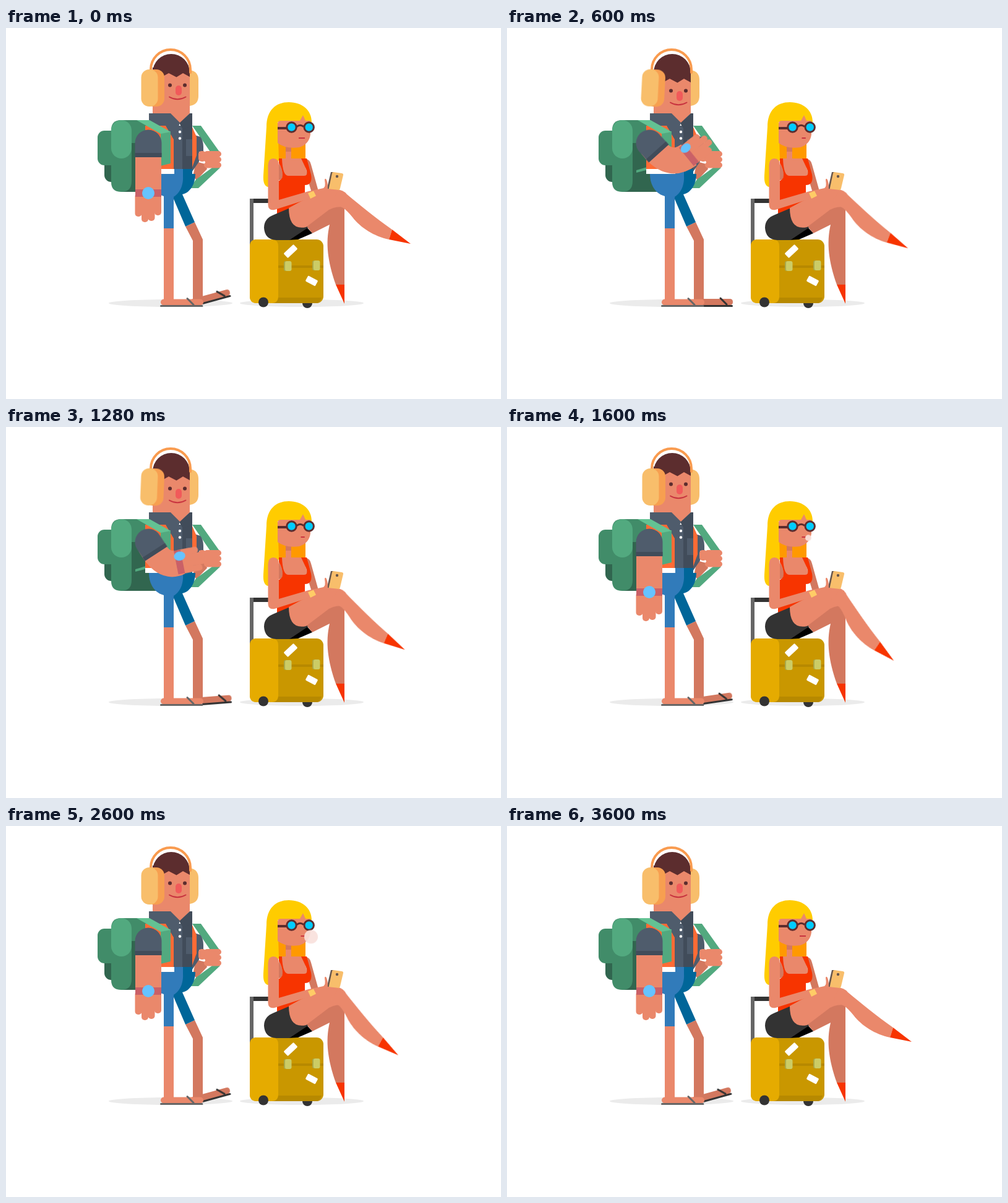
An HTML page without scripts for the animation above (3640 ms loop, 800 by 600 pixels).

```html
<!DOCTYPE html>
<html lang="en">
<head>
<meta charset="utf-8">
<title>Waiting travellers</title>
<style>
  html, body { margin: 0; width: 100%; height: 100%; overflow: hidden; background: #fff; }
  svg { display: block; width: 800px; height: 600px; }

  .skin { fill: #ea886b; }
  .skin-dark { fill: #d3785f; }
  .shirt { fill: #4f5c6c; }
  .shirt-dark { fill: #414c5a; }
  .green { fill: #418c69; }
  .green-light { fill: #52a97f; }
  .green-dark { fill: #31664f; }
  .brown { fill: #5c2d2e; }
  .sand { fill: #f8be6b; }
  .vest { fill: #ff6b35; }
  .red { fill: #f73400; }
  .coal { fill: #333; }
  .line { fill: none; stroke-linecap: round; }

  /* one look at the watch per loop */
  .look { animation: 3640ms infinite ease-in-out; }
  .nod { animation-name: nod; }
  .pad { animation-name: pad; transform-origin: 237px 97px; }
  .sleeve { animation-name: sleeve; transform-origin: 230px 186px; }
  .forearm { animation-name: forearm; fill: none; stroke: #ea886b; stroke-width: 42; }
  .hand { animation-name: hand; }
  .watch { animation-name: watch; }
  @keyframes nod {
    0%, 2.7%, 43.4%, 100% { transform: none; }
    14.8%, 31.3% { transform: translateY(9px); }
  }
  @keyframes pad {
    0%, 2.7%, 43.4%, 100% { transform: none; }
    14.8%, 31.3% { transform: translateX(-1px) rotate(3deg); }
  }
  @keyframes sleeve {
    0%, 2.7%, 43.4%, 100% { transform: rotate(0deg); }
    14.8%, 31.3% { transform: rotate(-42deg); }
  }
  @keyframes forearm {
    0%, 2.7%, 43.4%, 100% { d: path("M230 191C230 212 230 240 230 268"); }
    14.8%, 31.3% { d: path("M234 191C246 207 266 226 294 205"); }
  }
  @keyframes hand {
    0%, 2.7%, 43.4%, 100% { transform: translate(230px, 267px) rotate(0deg) scale(1); }
    14.8%, 31.3% { transform: translate(294px, 205px) rotate(-129deg) scale(.9); }
  }
  @keyframes watch {
    0%, 2.7%, 43.4%, 100% { transform: translate(0px, 0px) scale(1, 1); }
    14.8%, 31.3% { transform: translate(13px, 3px) scale(.75, 1); }
  }

  .tap { animation: tap 520ms infinite linear; transform-origin: 303px 447px; }
  @keyframes tap {
    0%, 84.6%, 100% { transform: rotate(-15.5deg); }
    7.7% { transform: rotate(-8.5deg); }
    15.4% { transform: rotate(0deg); }
    24% { transform: rotate(0deg); animation-timing-function: ease-in-out; }
  }

  .swing { animation: swing 728ms infinite linear; transform-origin: 540px 264px; }
  @keyframes swing {
    0% { transform: rotate(0deg); animation-timing-function: ease-in-out; }
    19.5%, 32% { transform: rotate(16.5deg); }
    45% { transform: rotate(15.4deg); }
    57% { transform: rotate(12deg); }
    82.4% { transform: rotate(3.8deg); }
    94%, 100% { transform: rotate(0deg); }
  }

  .bubble { animation: bubble 3640ms infinite; transform-origin: 482px 179.5px; }
  @keyframes bubble {
    0%, 40.7% { transform: scale(0); }
    44% { transform: scale(.37); }
    61.5% { transform: scale(1); animation-timing-function: ease-in; }
    71.4% { transform: scale(.82); animation-timing-function: linear; }
    76.9% { transform: scale(.5); animation-timing-function: linear; }
    82%, 100% { transform: scale(0); }
  }
  .lips { animation: lips 3640ms infinite; transform-origin: 483px 178px; }
  @keyframes lips {
    0%, 4%, 86%, 100% { transform: none; }
    10%, 80% { transform: scaleX(.65); }
  }
</style>
</head>
<body>
<svg viewBox="0 0 800 600">
  <g fill="#ebebeb">
    <ellipse cx="266" cy="445" rx="100" ry="6"/>
    <ellipse cx="478" cy="445" rx="100" ry="6"/>
  </g>

  <g id="man">
    <g id="backpack">
      <rect class="green-dark" x="159" y="190" width="30" height="59" rx="11"/>
      <rect class="green" x="148" y="166" width="34" height="56" rx="11"/>
      <path class="green" d="M186 149H250V265H186Q170 265 170 249V165Q170 149 186 149Z"/>
      <path class="green-dark" d="M203 186H262V265H186Q203 265 203 248Z"/>
      <rect class="green-light" x="170" y="149" width="33" height="62" rx="16.5"/>
      <path class="green-light" d="M209 230L240 221V226L209 234Z"/>
    </g>

    <path class="skin-dark" d="M307 216L322 220L325 228L308 246L302 240Z"/>
    <path class="green-light" d="M301 158H315L347 203H332ZM333 226H346L311 259H297L307 245Z"/>
    <path class="shirt" d="M301 172L314 176Q319 182 319 192V200H312V216L301 232Z"/>
    <path class="vest" d="M225 158H272V228H225ZM300 158L308 176V206L300 228Z"/>
    <path fill="#fff" d="M225 228H272V236H225Z"/>

    <path class="skin-dark" d="M290 321L305 314L318 342V444H302V344Z"/>
    <path fill="#069" d="M285 228H301V236H306C306 254 296 267 285 269L305 314L290 321L269 272Z"/>
    <path class="skin" d="M255 322H271V444H255Z"/>
    <path fill="#317bba" d="M231 236H272V228H286V240C287 255 280 268 271 273V324H255V272C240 268 231 254 231 236Z"/>

    <g class="tap">
      <path class="skin-dark" d="M303 438H360Q365 438 365 443Q365 448 360 448H303Z"/>
      <path class="line" stroke="#333" stroke-width="3" d="M318 449.5H363.500M345 437L355 447"/>
    </g>
    <rect class="skin" x="250" y="438.500" width="69" height="10" rx="5"/>
    <path class="line" stroke="#666" stroke-width="3" d="M250.500 449.500H317M293 437.500L303 447.500"/>

    <path class="shirt" d="M271 158H286V228H271Z"/>
    <path class="shirt-dark" d="M285 150H301V228H285Z"/>
    <path class="shirt" d="M291 180H301V207H291Z"/>
    <path class="skin" d="M237 70H297V138L281 154L262 138H237Z"/>
    <path class="shirt" d="M231 138H266L281 153L272 182L258 158H231Z"/>
    <path class="shirt-dark" d="M301 138L297 138L280 154L286 164L301 158Z"/>
    <g fill="#fff"><circle cx="281" cy="168" r="2.200"/><circle cx="281" cy="178.500" r="2.200"/></g>

    <g id="head">
      <path class="sand" d="M297 68Q311 70 311 84V110Q311 124 297 126Z"/>
      <path class="brown" d="M237 73V72A30 30 0 0 1 297 72V73Z"/>
      <g class="look nod">
        <path class="brown" d="M237 64H297V79L286 73L275.500 79.500L263 73L252 79H237Z"/>
        <g class="brown"><circle cx="265" cy="92.500" r="3"/><circle cx="289" cy="92.500" r="3"/></g>
        <rect x="274" y="93" width="10" height="16" rx="5" fill="#f15a5a"/>
        <path class="line" stroke="#c8333f" stroke-width="2" d="M264 111.500Q277 119 290.500 111.500"/>
      </g>
      <path class="line" stroke="#f99b4f" stroke-width="4" d="M234 72V67A32 32 0 0 1 298 67V72"/>
      <g class="look pad">
        <rect x="226" y="67" width="30" height="60" rx="13" fill="#f79f50"/>
        <rect class="sand" x="218.500" y="67" width="27" height="60" rx="13"/>
      </g>
    </g>

    <path class="green-light" d="M250 170L266 167V219L250 223Z"/>
    <path fill="#63c293" d="M211 149H232L266 168L250 171Z"/>

    <g class="skin">
      <rect x="311" y="199" width="12" height="17" rx="5"/>
      <path d="M322 200H336V225H322Z"/>
      <rect x="320" y="199" width="28" height="9.500" rx="4.700"/>
      <rect x="320" y="208" width="28" height="9.500" rx="4.700"/>
      <rect x="320" y="217" width="28" height="9.500" rx="4.700"/>
    </g>

    <path class="look forearm" d="M230 191C230 212 230 240 230 268"/>
    <g class="look hand">
      <g class="skin">
        <path d="M-21 0H21V22H-21Z"/>
        <rect x="-21.500" y="0" width="11" height="38" rx="5"/>
        <rect x="-11" y="6" width="11" height="41" rx="5"/>
        <rect x="-.5" y="6" width="11" height="39" rx="5"/>
        <rect x="10" y="0" width="11" height="36" rx="5"/>
      </g>
      <path fill="#ca6067" d="M-21 -6H21V6H-21Z"/>
      <circle class="look watch" r="10" fill="#66c3ff"/>
    </g>
    <g class="look sleeve">
      <path class="shirt" d="M208.500 209V186A21.500 21.500 0 0 1 251.500 186V209Z"/>
      <path class="shirt-dark" d="M208.500 202H251.500V209H208.500Z"/>
    </g>
  </g>

  <g id="suitcase">
    <path class="coal" d="M397 276H426V283H397Z"/>
    <path fill="#666" d="M394 276H400V352H394Z"/>
    <circle class="coal" cx="487" cy="445" r="8"/>
    <rect x="394" y="342" width="119" height="103" rx="11" fill="#c99700"/>
    <path fill="#b78900" d="M430 384H513V388H430ZM430 436H510Q507 445 502 445H430Z"/>
    <path fill="#e5ab00" d="M405 342H429Q440 342 440 353V434Q440 445 429 445H405Q394 445 394 434V353Q394 342 405 342Z"/>
    <circle class="coal" cx="416" cy="443.500" r="8"/>
    <g fill="#fff">
      <rect x="-11" y="-5" width="22" height="10" rx="1.500" transform="translate(460 361) rotate(-43)"/>
      <rect x="-9" y="-5" width="18" height="10" rx="1.500" transform="translate(494 409) rotate(28)"/>
    </g>
    <g fill="#a9a94c">
      <rect x="449" y="377" width="10" height="16" rx="3"/>
      <rect x="495" y="376" width="10" height="16" rx="3"/>
    </g>
    <g fill="#cc6">
      <rect x="451" y="377" width="10.500" height="16" rx="3"/>
      <rect x="497" y="376" width="10.500" height="16" rx="3"/>
    </g>
  </g>

  <g id="woman">
    <path fill="#f90" d="M439 176H484V214H439Z"/>
    <path class="skin-dark" d="M484 212Q491 212 493 221L505 264L494 266L486 240Z"/>

    <path class="skin-dark" d="M485 320L520 288H547V415H533C520 378 516 348 523 318L495 332Z"/>
    <path class="red" d="M533 415H547V446Z"/>
    <path d="M456 343L485 321L495 332L472 342Z"/>

    <path class="skin" d="M452 198H461V211H482L487 240H441V211H452Z"/>
    <path class="skin-dark" d="M452 190H461V200H452ZM441 220Q447 228 447 240Q447 246 441 246Z"/>
    <path class="red" d="M441 211H446Q447 239 456 239H482Q488 239 486 230L477 211H486L493 237Q496 254 483 254V285L458 300H438V248Q447 246 447 238Q447 228 441 218Z"/>
    <path class="coal" d="M459 291L433 302Q417 308 417 323Q418 342 437 343H458L488 323Z"/>

    <path class="skin" d="M457 291Q490 272 520 263Q534 259 545 265L549 290Q530 287 518 297L485 322Q457 328 457 291Z"/>
    <g class="swing">
      <path class="skin" d="M527 262Q543 259 551 269C573 287 598 308 624 326L619 342C595 337 573 323 560 306Q552 296 545 291L530 284Z"/>
      <path class="red" d="M624 326L654 349L619 342Z"/>
    </g>

    <g id="phone">
      <path fill="#66554d" d="M525 233H530L524 263H518Z"/>
      <path class="sand" d="M529 233L543 235Q545.500 235.500 545 238L540 259Q539 263 536 263H521L527 235Q527.500 233 529 233Z"/>
      <circle cx="535" cy="240" r="2.200" fill="#66554d"/>
    </g>

    <path fill="#fc0" d="M439 150L441 212Q432 258 423 257Q415 255 416 238L421 160C421 133 436 120 457 120C480 120 494 134 494 152H439Z"/>
    <path class="skin" d="M423.500 222Q424 211 432 211Q441 211 441 222V278L489 264L513 259Q517 257 515 246Q515 243 517 244Q520 247 520 260L538 262L530 274L500 273L434 294Q424 296 423.500 286Z"/>
    <path fill="#fc6" d="M488 267L497 263.500L501 271.500L492 276Z"/>

    <path class="skin" d="M444 150H475L480 141L484 150H492V172Q490 188 474 193Q452 196 439 186V155Q439 150 444 150Z"/>
    <g stroke="#5c2d2e" stroke-width="3" fill="#0cf">
      <path fill="none" d="M470 159.500Q475.500 155 481 159.500"/>
      <path fill="none" stroke-width="4" d="M439 162H454"/>
      <circle cx="461.500" cy="160.500" r="7.700"/>
      <circle cx="489.700" cy="160.500" r="7.700"/>
    </g>
    <path class="lips" fill="#c8333f" d="M473 177H483V179H473Z"/>
    <circle class="bubble" cx="495.500" cy="179" r="13.500" fill="#f9e1dc" opacity=".92"/>
  </g>
</svg>
</body>
</html>
```
